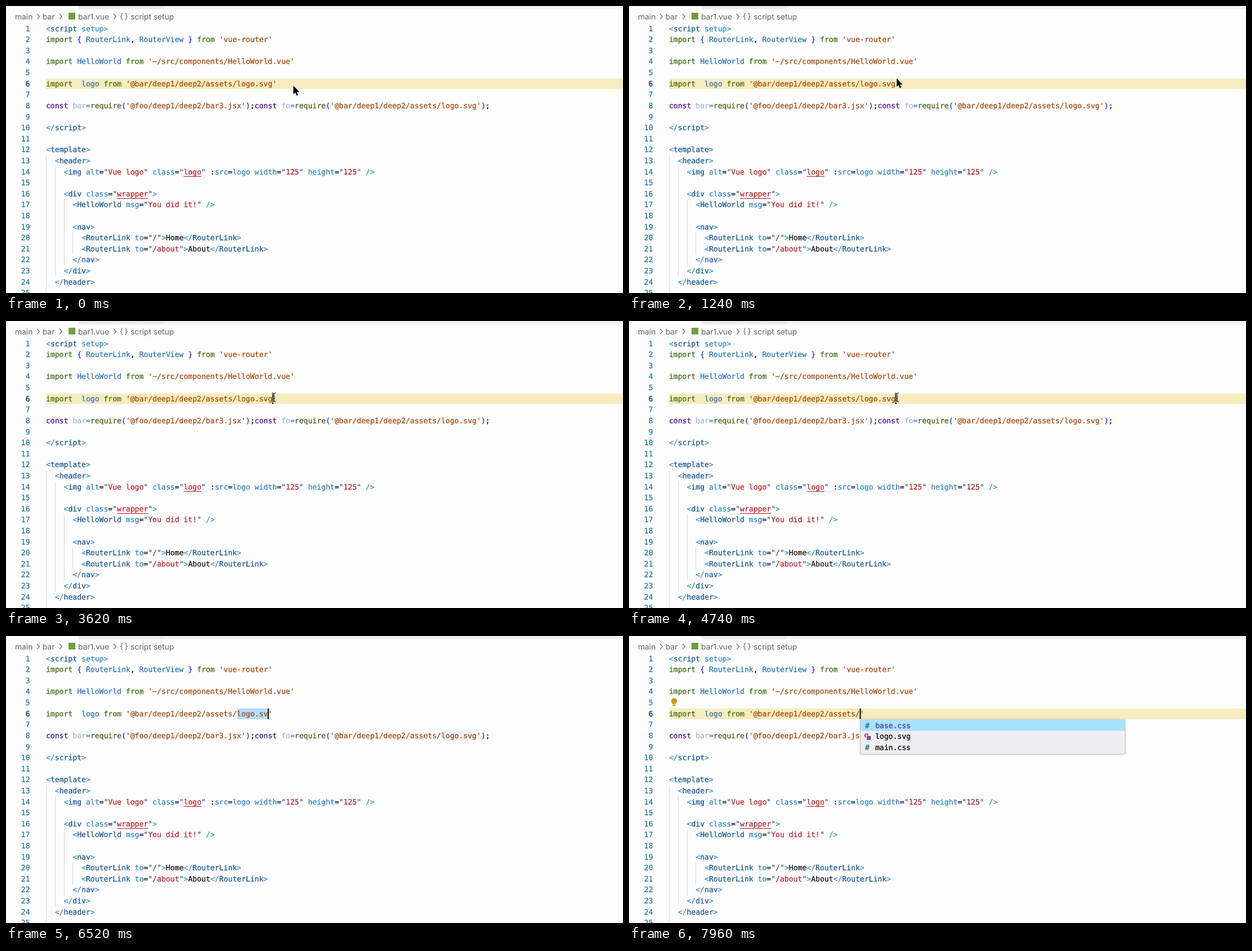
An HTML page with a canvas for the animation above (8000 ms loop, 1095 by 511 pixels).

```html
<!DOCTYPE html>
<html lang="en">
<head>
<meta charset="utf-8">
<title>Path completion in an editor</title>
<style>
html, body { margin: 0; width: 100%; height: 100%; overflow: hidden; background: #fdfdfd; }
canvas { display: block; width: 1095px; height: 511px; }
</style>
</head>
<body>
<canvas id="stage" width="1095" height="511"></canvas>
<script>
const ctx = document.getElementById('stage').getContext('2d');
const LOOP = 8000, LEFT = 71, CHAR = 7.88, ROW = 19.61, FIRST = 40.4;
const MONO = '13.08px "DejaVu Sans Mono", monospace';
const SANS = '13.8px Inter, sans-serif';

// Moments of each action, in ms
const T = { move: 100, arrive: 860, drift: 1760, beam: 2900, click: 3300,
            erase: 5400, select: 5860, clear: 7640, popup: 7800 };

const COLORS = {
  g: '#3c6b12', b: '#2b72b4', s: '#a3480c', p: '#0431fa', k: '#4b0a96',
  f: '#4c5a14', v: '#9abbd2', t: '#17568f', a: '#2f84c4', r: '#b8202a',
  x: '#111111', q: '#2564a4', l: '#3c8cc0'
};

// Each run starts with ¦ and a colour key
const LINES = [
  '¦l<¦tscript ¦asetup¦l>',
  '¦gimport ¦p{ ¦bRouterLink¦x, ¦bRouterView ¦p} ¦gfrom ¦s\'vue-router\'',
  '',
  '¦gimport ¦bHelloWorld ¦gfrom ¦s\'~/src/components/HelloWorld.vue\'',
  '',
  '¦gimport  ¦blogo ¦gfrom ¦s\'@bar/deep1/deep2/assets/',
  '',
  '¦kconst ¦vbar¦a=¦frequire¦p(¦s\'@foo/deep1/deep2/bar3.jsx\'¦p)¦x;¦kconst ¦vfo¦a=¦frequire¦p(¦s\'@bar/deep1/deep2/assets/logo.svg\'¦p)¦x;',
  '',
  '¦l</¦tscript¦l>',
  '',
  '¦l<¦ttemplate¦l>',
  '¦l  <¦theader¦l>',
  '¦l    <¦timg ¦aalt¦x=¦q"¦rVue logo¦q" ¦aclass¦x=¦q"¦rlogo¦q" ¦x:¦asrc¦x=¦alogo width¦x=¦q"¦r125¦q" ¦aheight¦x=¦q"¦r125¦q" ¦l/>',
  '',
  '¦l    <¦tdiv ¦aclass¦x=¦q"¦rwrapper¦q"¦l>',
  '¦l      <¦tHelloWorld ¦amsg¦x=¦q"¦rYou did it!¦q" ¦l/>',
  '',
  '¦l      <¦tnav¦l>',
  '¦l        <¦tRouterLink ¦ato¦x=¦q"¦r/¦q"¦l>¦xHome¦l</¦tRouterLink¦l>',
  '¦l        <¦tRouterLink ¦ato¦x=¦q"¦r/about¦q"¦l>¦xAbout¦l</¦tRouterLink¦l>',
  '¦l      </¦tnav¦l>',
  '¦l    </¦tdiv¦l>',
  '¦l  </¦theader¦l>',
  ''
].map(line => line.split('¦').slice(1).map(run => [COLORS[run[0]], run.slice(1)]));

const colX = col => LEFT + col * CHAR;
const rowY = n => FIRST + (n - 1) * ROW;

function rect(x, y, w, h, color) {
  ctx.fillStyle = color;
  ctx.fillRect(x, y, w, h);
}

function round(x, y, w, h, r, color) {
  ctx.fillStyle = color;
  ctx.beginPath();
  ctx.roundRect(x, y, w, h, r);
  ctx.fill();
}

// A hairline stroke gives the slightly heavy look of smoothed type
function text(str, x, y, color, font = MONO, align = 'left') {
  const base = Math.round(y + 4.25);
  ctx.font = font;
  ctx.textAlign = align;
  ctx.fillStyle = ctx.strokeStyle = color;
  ctx.fillText(str, x, base);
  if (font === SANS) return;
  ctx.lineWidth = 0.25;
  ctx.strokeText(str, x, base);
}

function code(str, col, n, color) {
  text(str, colX(col), rowY(n), color);
}

function path(points, close) {
  ctx.beginPath();
  points.forEach(([x, y], i) => i ? ctx.lineTo(x, y) : ctx.moveTo(x, y));
  if (close) ctx.closePath();
}

function breadcrumbs() {
  const color = '#616161';
  rect(129, 0, 966, 6, '#f3f3f6');
  rect(129, 0, 151, 6, '#ebebee');
  text('main', 16, 19.6, color, SANS);
  text('bar', 65, 19.6, color, SANS);
  text('bar1.vue', 128, 19.6, color, SANS);
  text('{\u2009}', 202, 18.6, color, SANS);
  text('script setup', 221, 19.6, color, SANS);
  rect(111, 12, 12, 12, '#6f9f3c');
  ctx.strokeStyle = color;
  ctx.lineWidth = 1.1;
  for (const x of [55, 95, 191]) {
    path([[x, 14], [x + 4.5, 18.8], [x, 23.6]]);
    ctx.stroke();
  }
}

function guides() {
  [[13, 26], [14, 23], [17, 22], [20, 21]].forEach(([from, to], i) =>
    rect(Math.round(colX(i * 2)), rowY(from) - ROW / 2, 1, (to - from + 1) * ROW, '#d6d6d6'));
}

function underline(col, n, length) {
  rect(colX(col), rowY(n) + 7.5, length * CHAR, 1.2, '#c02f38');
}

function lines() {
  LINES.forEach((runs, i) => {
    const n = i + 1;
    text(n, 42.5, rowY(n), n === 6 ? '#0b216f' : '#237893', MONO, 'right');
    let col = 0;
    for (const [color, str] of runs) {
      code(str, col, n, color);
      col += str.length;
    }
  });
  underline(31, 14, 4);
  underline(16, 16, 7);
}

function caret(t, col) {
  if (t < T.click) return;
  const last = [T.popup, T.clear, T.erase, T.click].find(at => t >= at);
  if ((t - last) % 1000 < 500) rect(Math.round(colX(col)) - 0.5, 129, 2, 19, '#000');
}

function arrow(x, y) {
  const shape = [[0, 0], [0, 15], [3.4, 11.9], [5.8, 17.4], [8.3, 16.3], [6, 11], [10.7, 10.7]];
  path(shape.map(([dx, dy]) => [x + dx, y + dy]), true);
  ctx.lineJoin = 'round';
  ctx.strokeStyle = '#fff';
  ctx.lineWidth = 2;
  ctx.stroke();
  ctx.fillStyle = '#000';
  ctx.fill();
}

function beam(x, y) {
  for (const [color, width] of [['#fff', 2.6], ['#111', 1.2]]) {
    ctx.strokeStyle = color;
    ctx.lineWidth = width;
    ctx.beginPath();
    ctx.moveTo(x - 3.5, y - 8);
    ctx.quadraticCurveTo(x, y - 8, x, y - 5);
    ctx.lineTo(x, y + 5);
    ctx.quadraticCurveTo(x, y + 8, x - 3.5, y + 8);
    ctx.moveTo(x + 3.5, y - 8);
    ctx.quadraticCurveTo(x, y - 8, x, y - 5);
    ctx.moveTo(x, y + 5);
    ctx.quadraticCurveTo(x, y + 8, x + 3.5, y + 8);
    ctx.moveTo(x - 2, y + 2);
    ctx.lineTo(x + 2, y + 2);
    ctx.stroke();
  }
}

function ease(t, from, to) {
  const p = Math.min(1, Math.max(0, (t - from) / (to - from)));
  return p * p * (3 - 2 * p);
}

function pointer(t) {
  if (t >= T.erase) return;
  if (t >= T.beam) return beam(475.5, 136);
  const p = ease(t, T.move, T.arrive);
  arrow(510 - 35 * p, 142 - 13 * p + 4 * ease(t, T.drift, T.drift + 400));
}

function bulb() {
  ctx.fillStyle = '#c99a10';
  ctx.beginPath();
  ctx.arc(80, 115.6, 5.2, 0, Math.PI * 2);
  ctx.fill();
  round(77.4, 118.4, 5.2, 6, 1, '#c99a10');
  rect(78.4, 121, 3.2, 1, '#fdfdfd');
}

function popup() {
  ctx.save();
  ctx.shadowColor = 'rgba(0,0,0,.16)';
  ctx.shadowBlur = 4;
  round(410, 148.5, 471, 62.5, 3, '#c4c4c8');
  ctx.restore();
  round(411, 149.5, 469, 60.5, 2, '#efeff1');
  rect(411, 149.5, 469, 19.5, '#a9e2ff');
  ['base.css', 'logo.svg', 'main.css'].forEach((name, i) => {
    const y = 159.3 + i * ROW;
    text(name, 437, y, i ? '#000' : '#4b2cae');
    if (i !== 1) return text('#', 419, y, '#3a7d9c', 'bold ' + MONO);
    rect(422, y - 1, 7, 7, '#7d4a9c');
    ctx.strokeStyle = '#7d4a9c';
    ctx.lineWidth = 1.8;
    ctx.beginPath();
    ctx.arc(421.5, y - 1.8, 2.9, Math.PI * 0.6, Math.PI * 1.95);
    ctx.stroke();
  });
}

function draw(t) {
  const file = t < T.erase ? 'logo.svg' : t < T.clear ? 'logo.sv' : '';
  const end = 43 + file.length;
  rect(0, 0, 1095, 511, '#fdfdfd');
  breadcrumbs();
  if (t >= T.select && t < T.clear) {
    round(colX(43), 129, 7 * CHAR, 19, 3, '#b2dffb');
    rect(colX(89), 168, 7 * CHAR, 19, '#e5f1fb');
  } else {
    rect(LEFT, 129, 1095 - LEFT, 19, '#f7ecbf');
  }
  guides();
  lines();
  code(file + "'", 43, 6, COLORS.s);
  if (t >= T.popup) {
    bulb();
    popup();
  }
  caret(t, end);
  pointer(t);
}

ctx.textRendering = 'geometricPrecision';
const start = performance.now();
function tick() {
  draw((performance.now() - start) % LOOP);
  requestAnimationFrame(tick);
}
tick();
</script>
</body>
</html>
```
